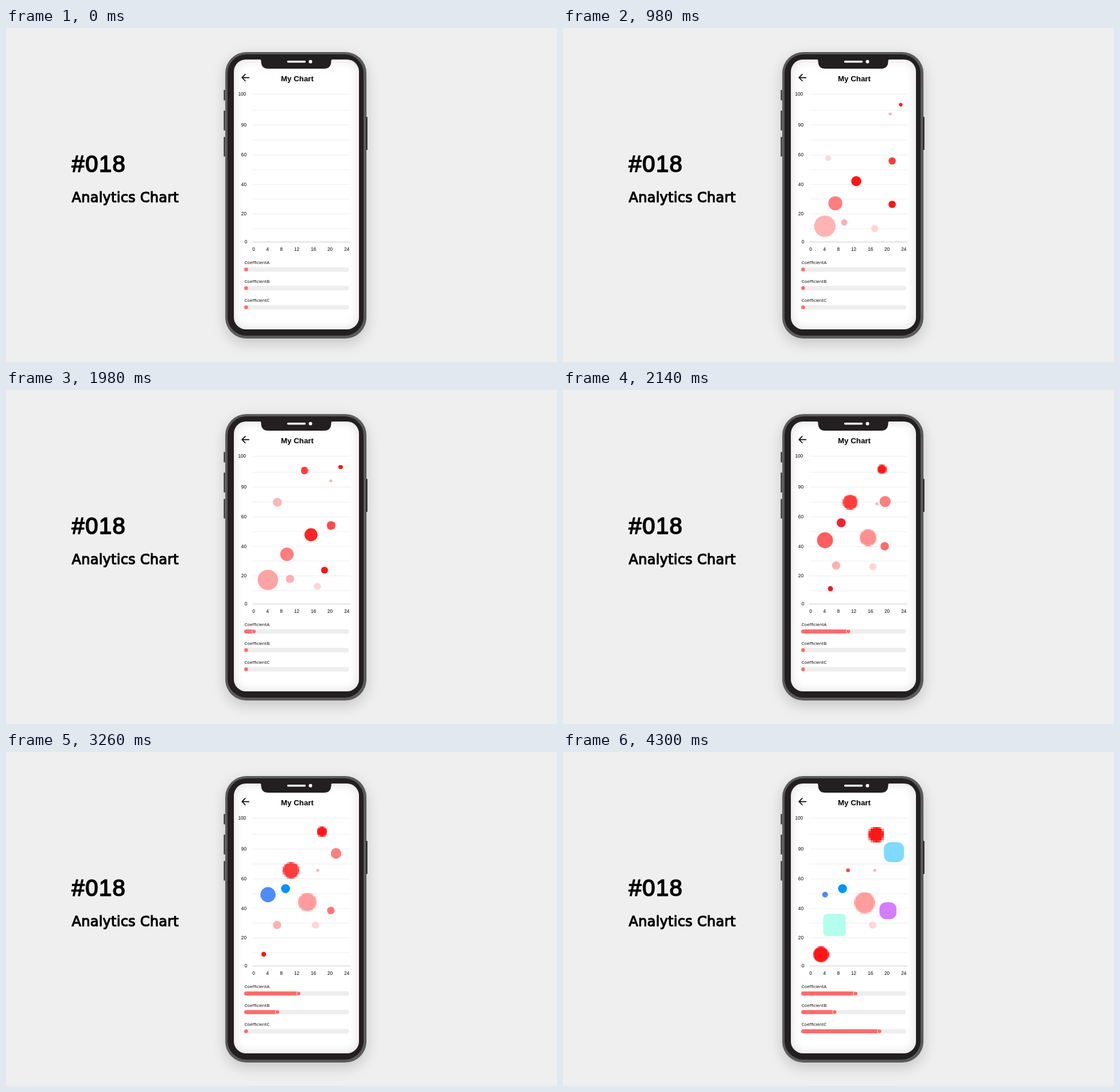
These frames come from a looping animation (960 px wide and 583 px high, 5960 ms). An HTML page with a canvas:

```html
<!DOCTYPE html>
<html lang="en">
<head>
<meta charset="utf-8">
<title>Analytics Chart</title>
<style>
  html, body { margin: 0; width: 100%; height: 100%; overflow: hidden; background: #efefef; }
  body { position: relative; }
  .phone, .glass, svg, canvas { position: absolute; }
  svg, canvas { left: 0; top: 0; display: block; }
  .phone {
    left: 381.5px; top: 41.5px; width: 246px; height: 500px; border-radius: 37px;
    background: #5a5b5d; box-shadow: 0 8px 24px rgba(0, 0, 0, .18);
  }
  .phone::before {
    content: ""; position: absolute; inset: 4.5px 4.5px 5px; border-radius: 33px; background: #231f20;
  }
  .glass {
    left: 397px; top: 54.5px; width: 217.5px; height: 471.5px; border-radius: 21px;
    background: #fff; box-shadow: inset 0 0 18px rgba(0, 0, 0, .14);
  }
  .big { stroke: #000; stroke-linejoin: round; }
  .number { font: 40px "Liberation Sans", Arial, sans-serif; stroke-width: 1.7px; letter-spacing: 1.4px; }
  .title { font: 24px "DejaVu Sans", sans-serif; stroke-width: 1.2px; letter-spacing: .25px; }
  .head { font: bold 13.3px "Liberation Sans", Arial, sans-serif; }
  .axis { font: 8.2px "Liberation Sans", Arial, sans-serif; }
  .name { font: 7.8px "Open Sans", "Noto Sans", sans-serif; }
</style>
</head>
<body>
<div class="phone"></div>
<div class="glass"></div>
<svg width="960" height="583" viewBox="0 0 960 583">
  <g class="big">
    <text class="number" x="114.6" y="250.8">#018</text>
    <text class="title" x="114.6" y="304">Analytics Chart</text>
  </g>
  <g fill="#1a1819">
    <rect x="379.5" y="108" width="2" height="18.5" rx="1"/>
    <rect x="379.5" y="144" width="2" height="35" rx="1"/>
    <rect x="379.5" y="190" width="2" height="34.5" rx="1"/>
    <rect x="627.6" y="155" width="2" height="58" rx="1"/>
  </g>
  <path fill="#231f20" d="M441 54Q444.5 54.5 444.5 58Q444.5 71 457 71H554Q566.5 71 566.5 58Q566.5 54.5 570 54Z"/>
  <path d="M491.5 58.7H520.5" stroke="#fff" stroke-width="3.4" stroke-linecap="round"/>
  <circle cx="530.5" cy="58.7" r="3" fill="#fff"/>
  <path d="M424 86.6H411.5M417.3 80.4L411.2 86.6L417.3 92.8" fill="none" stroke="#000" stroke-width="1.6"/>
  <text class="head" x="507.5" y="93" text-anchor="middle">My Chart</text>
  <g id="grid" stroke="#eee"></g>
  <g id="labels" class="axis" text-anchor="middle"></g>
  <g class="name">
    <text x="415.4" y="412.4">CoefficientA</text>
    <text x="415.4" y="444.9">CoefficientB</text>
    <text x="415.4" y="478.2">CoefficientC</text>
  </g>
</svg>
<canvas id="view" width="960" height="583"></canvas>
<script>
const LOOP = 5960, FLY = 370, MOVE = 365;
const STARTS = [1932, 2932, 3932];
const ORIGIN = [431, 371.5];
const ctx = document.getElementById('view').getContext('2d');
const NS = 'http://www.w3.org/2000/svg';

function add(parent, tag, attrs, text) {
  const el = document.createElementNS(NS, tag);
  for (const k in attrs) el.setAttribute(k, attrs[k]);
  if (text !== undefined) el.textContent = text;
  document.getElementById(parent).append(el);
}

[115.5, 143.5, 169.5, 195.5, 221.5, 247.5, 273, 298.5, 324.5, 350.5].forEach(y =>
  add('grid', 'path', { d: `M429.5 ${y}H600` }));
add('grid', 'path', { d: 'M429.5 373.5H600', stroke: '#ccc' });
[[100, 411.3, 118], [90, 414.4, 171.5], [60, 414.4, 224], [40, 414.4, 276.2], [20, 414.4, 327], [0, 418, 376.4],
 [0, 431.5, 388.6], [4, 455.5, 388.6], [8, 479.7, 388.6], [12, 506.6, 388.6], [16, 535.8, 388.6],
 [20, 564.6, 388.6], [24, 593.7, 388.6]]
  .forEach(([n, x, y]) => add('labels', 'text', { x, y }, n));

// at: take-off time; a, b, c: [x, y, radius, corner] after each move;
// color: one per move; swap: colour that cuts in with the last move; bitmap: enlarged as a small raster
const bubbles = [
  { at: 270, a: [588.5, 133.8, 3.1], b: [550.6, 139, 8.6], c: [545.8, 144, 13.5], color: ['#ff1616'], bitmap: true },
  { at: 335, a: [570, 150, 2.5], b: [543.2, 206.5, 2.5], color: ['#ffb0b4'] },
  { at: 400, a: [543, 350, 6.3], b: [539.5, 302, 6.3], color: ['#ffd6d6'] },
  { at: 455, a: [474.5, 306, 12.2], b: [575, 177, 9.2], c: [576.6, 174.8, 17.5, 12], color: ['#ff7e7e'], swap: '#7edaff' },
  { at: 510, a: [573.5, 232, 6.3], b: [525, 262, 16], c: [525.6, 263, 18.5], color: ['#ff3c3c', '#ff9c9c'], bitmap: true },
  { at: 545, a: [573.5, 307.8, 6.4], b: [449, 353, 4.2], c: [449.6, 353.4, 14], color: ['#ff1515'], bitmap: true },
  { at: 565, a: [456.2, 346, 18.6], b: [456.5, 249, 13.2], c: [456.6, 249, 5], color: ['#ffb3b3', '#ff5050', '#4e8aff'] },
  { at: 766, a: [498.8, 334.5, 7.2], b: [472.2, 302, 7.2], c: [473, 302, 19.6, 6.5], color: ['#ffb0b0'], swap: '#b3ffee' },
  { at: 777, a: [525.4, 248.5, 12.2], b: [566, 276.6, 6.6], c: [566.2, 277, 14.8, 11.5], color: ['#ff1515', '#ff7878'], swap: '#d47eff' },
  { at: 800, a: [470.3, 188.6, 7.8], b: [487, 238.6, 7.8], color: ['#ffd6d6', '#ff0010', '#0094ff'] },
  { at: 930, a: [524.2, 129, 5.2], b: [496.6, 206.3, 14.2], c: [496.6, 206.5, 3.2], color: ['#ff3d3d'], bitmap: true }
];
const sliders = [[421.5, 509.7], [454, 473.3], [487.5, 551.5]];

// cubic-bezier(.25, .1, .25, 1)
function ease(t) {
  if (t <= 0) return 0;
  if (t >= 1) return 1;
  let lo = 0, hi = 1, u = t;
  const curve = (p, q) => 3 * u * (1 - u) ** 2 * p + 3 * u * u * (1 - u) * q + u ** 3;
  for (let i = 0; i < 24; i++) {
    u = (lo + hi) / 2;
    if (curve(.25, .25) < t) lo = u; else hi = u;
  }
  return curve(.1, 1);
}

const lerp = (a, b, p) => a + (b - a) * p;
const channels = hex => [1, 3, 5].map(i => parseInt(hex.slice(i, i + 2), 16));
function blend(from, to, p) {
  const b = channels(to);
  return `rgb(${channels(from).map((v, i) => Math.round(lerp(v, b[i], p)))})`;
}

function disc(c, x, y, r, color) {
  c.fillStyle = color;
  c.beginPath();
  c.arc(x, y, r, 0, 7);
  c.fill();
}

// Enlarges a small raster of the disc, so its pixels show
const tile = document.createElement('canvas');
const tileCtx = tile.getContext('2d');
function bitmapDisc(x, y, r, base, color) {
  const size = Math.ceil(base * 2);
  tile.width = tile.height = size;
  disc(tileCtx, size / 2, size / 2, size / 2, color);
  ctx.imageSmoothingEnabled = false;
  ctx.drawImage(tile, x - r, y - r, 2 * r, 2 * r);
}

function drawBubble(b, t, moves) {
  const fly = ease((t - b.at) / FLY);
  if (!fly) return;
  const end = b.c || b.b;
  const [x, y, r] = [0, 1, 2].map(i => lerp(lerp(b.a[i], b.b[i], moves[0]), end[i], moves[2]));
  const [c0, c1 = c0, c2 = c1] = b.color;
  const color = moves[1] ? blend(c1, c2, moves[1]) : blend(c0, c1, moves[0]);
  if (b.swap && moves[2]) {
    ctx.fillStyle = b.swap;
    ctx.beginPath();
    ctx.roundRect(x - r, y - r, 2 * r, 2 * r, Math.min(r, lerp(b.b[2], end[3], moves[2])));
    ctx.fill();
  } else if (b.bitmap && r > b.a[2] + .1) {
    bitmapDisc(x, y, r, b.a[2], color);
  } else {
    disc(ctx, lerp(ORIGIN[0], x, fly), lerp(ORIGIN[1], y, fly), r * fly * fly, color);
  }
}

function bar(y, width, height, color) {
  ctx.fillStyle = color;
  ctx.beginPath();
  ctx.roundRect(415, y - height / 2, width, height, Math.min(width, height) / 2);
  ctx.fill();
}

function drawSlider([y, end], p) {
  const x = lerp(418.3, end, p);
  bar(y, 182.7, 8, '#eee');
  if (p) {
    bar(y, x - 415, 7, '#ff6b6b');
    disc(ctx, x, y, 4.2, '#fff');
  }
  disc(ctx, x, y, 3.3, '#ff6b6b');
}

function draw(now) {
  const t = now % LOOP;
  const moves = STARTS.map(s => ease((t - s) / MOVE));
  ctx.clearRect(0, 0, 960, 583);
  sliders.forEach((s, i) => drawSlider(s, moves[i]));
  bubbles.forEach(b => drawBubble(b, t, moves));
}

let began;
function tick(now) {
  if (began === undefined) began = now;
  draw(now - began);
  requestAnimationFrame(tick);
}
draw(0);
requestAnimationFrame(tick);
</script>
</body>
</html>
```
